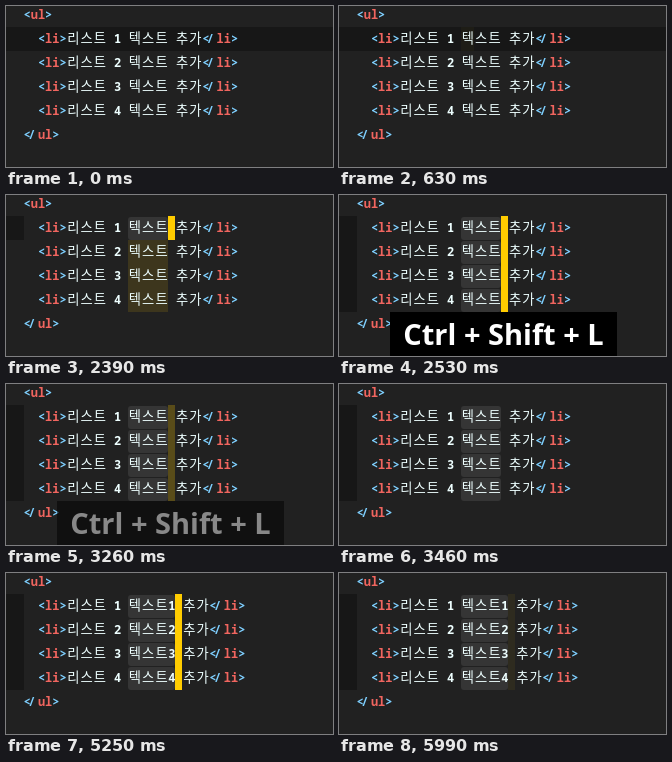
Recreate the animation shown at these times as an HTML page with a canvas. Size 327x161 px, loop 6470 ms.

```html
<!DOCTYPE html>
<html lang="ko">
<head>
<meta charset="utf-8">
<title>Multi-cursor editing</title>
<style>
html, body { margin: 0; overflow: hidden; background: #212121; }
canvas { display: block; }
</style>
</head>
<body>
<canvas id="stage" width="327" height="161"></canvas>
<script>
const ctx = document.getElementById('stage').getContext('2d');
const LOOP = 6470;
const LINE = 24, TOP = 21, LEFT = 17.5, GUTTER = 18;
const CELL = 7.2, WIDE = 13.33;
const WORD = 122, WORD_END = 162;
const CODE = '600 12px "Noto Sans Mono", monospace';
const HANGUL = '300 13.3px "Noto Sans CJK KR", "Noto Sans CJK", sans-serif';
const COLOR = { bg: '#212121', text: '#eeffff', mark: '#7fd0ff', tag: '#f0655f', cursor: '#ffcc00' };

// Stepped [time, opacity] keys
const BLINK = [[0, 0], [140, .25], [210, .75], [280, 1], [490, .75], [560, .25], [630, .03],
  [1030, 1], [1700, .68], [1770, .2], [1840, 0], [2320, .6], [2390, 1],
  [3190, .75], [3260, .25], [3330, 0], [5250, 1], [5920, .4], [5990, .06]];
const KEYS = [[0, 0], [2530, 1], [3190, .8], [3260, .5], [3330, .25], [3460, 0]];

const stepAt = (keys, t) => keys.findLast(([start]) => start <= t)[1];
const rowTop = row => TOP + row * LINE;

function fill(color, x, y, w, h, radius = 0) {
  ctx.fillStyle = color;
  ctx.beginPath();
  ctx.roundRect(x, y, w, h, radius);
  ctx.fill();
}

// Draws monospaced text cell by cell and returns the next x
function type(text, x, row, color) {
  ctx.fillStyle = color;
  for (const ch of text) {
    const wide = ch >= '가';
    ctx.font = wide ? HANGUL : CODE;
    ctx.fillText(ch, x + (wide ? .5 : 0), rowTop(row) + 16);
    x += wide ? WIDE : CELL;
  }
  return x;
}

function tag(name, x, row, closing) {
  x = type('<', x, row, COLOR.mark);
  if (closing) x = type('/', x - 2.5, row, COLOR.mark) + 2.5;
  x = type(name, x, row, COLOR.tag);
  return type('>', x, row, COLOR.mark);
}

function item(row, numbered) {
  let x = tag('li', LEFT + 2 * CELL, row);
  x = type(`리스트 ${row + 1} 텍스트${numbered ? row + 1 : ''} 추가`, x, row, COLOR.text);
  tag('li', x, row, true);
}

function drawSelection(t, wordEnd, prompting) {
  const rows = t < 2530 ? 1 : 4;
  const width = wordEnd - WORD;
  fill('#171717', 0, TOP, t < 1030 ? 327 : GUTTER, rows * LINE);
  if (t < 1030) return;
  for (let row = 0; row < rows; row++) {
    fill(prompting ? '#2b2b2b' : '#353535', WORD, rowTop(row) + 1, width, LINE - 1, 3);
  }
  if (rows === 1) fill('#3d361d', WORD, rowTop(1), width, 3 * LINE);
}

function drawCursors(t, wordEnd) {
  ctx.globalAlpha = stepAt(BLINK, t);
  if (t < 1030) {
    fill(COLOR.cursor, WORD, TOP, 13, LINE);
    type('텍', WORD + .3, 0, '#0033ff');
  } else {
    fill(COLOR.cursor, wordEnd, TOP, 7, LINE * (t < 2530 ? 1 : 4));
  }
  ctx.globalAlpha = 1;
}

function drawPrompt() {
  ctx.shadowColor = 'rgba(0, 0, 0, .35)';
  ctx.shadowBlur = 8;
  fill(COLOR.bg, -20, -20, 367, 42);
  ctx.shadowBlur = 0;
  ctx.font = '12.5px "Open Sans", sans-serif';
  ctx.fillStyle = '#757575';
  ctx.textAlign = 'right';
  ctx.fillText("Press 'Enter' to confirm your input or 'Escape' to cancel", 264, 15);
  ctx.textAlign = 'left';
}

function drawKeys(t) {
  ctx.globalAlpha = stepAt(KEYS, t);
  fill('#000', 51, 117, 227, 44);
  ctx.font = '700 29px "Open Sans", sans-serif';
  ctx.fillStyle = '#fff';
  ctx.textAlign = 'center';
  ctx.fillText('Ctrl + Shift + L', 164.5, 150);
  ctx.textAlign = 'left';
  ctx.globalAlpha = 1;
}

function draw(t) {
  const numbered = t >= 4320;
  const prompting = t >= 3790 && t < 5250;
  const wordEnd = numbered ? WORD_END + 7 : WORD_END;
  fill(COLOR.bg, 0, 0, 327, 161);
  drawSelection(t, wordEnd, prompting);
  tag('ul', LEFT, -1);
  for (let row = 0; row < 4; row++) item(row, numbered);
  tag('ul', LEFT, 4, true);
  drawCursors(t, wordEnd);
  if (prompting) drawPrompt();
  drawKeys(t);
}

const start = performance.now();
function frame() {
  draw((performance.now() - start) % LOOP);
  requestAnimationFrame(frame);
}
frame();
</script>
</body>
</html>
```
